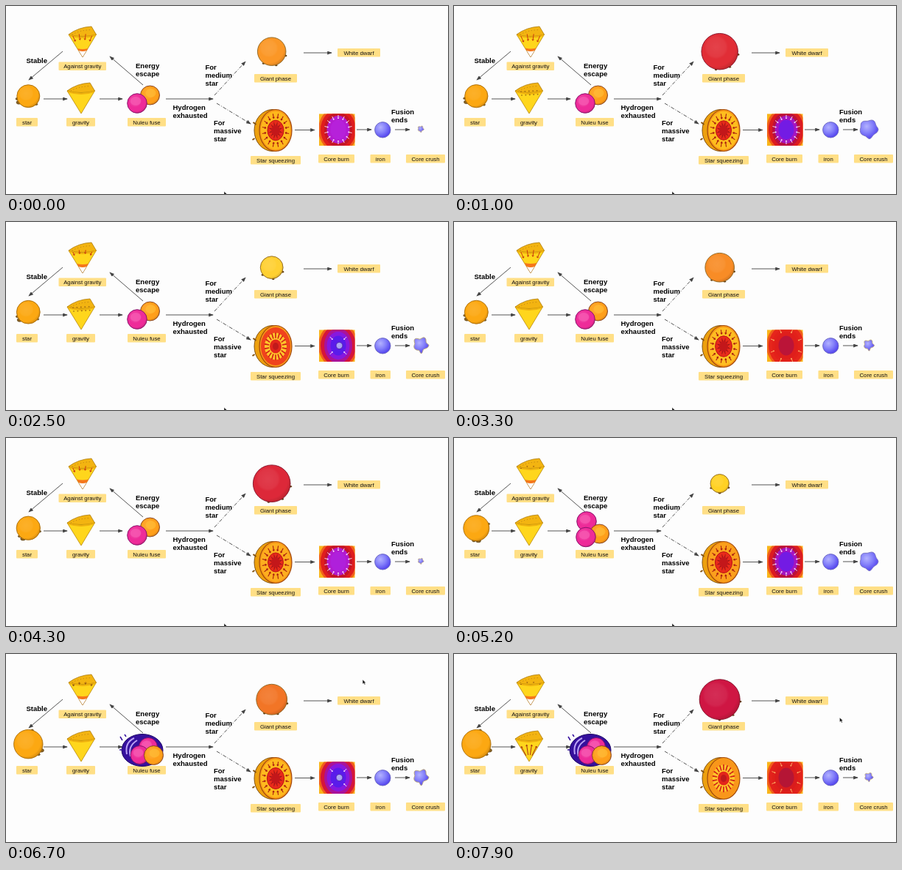
Write an HTML page that moves like this. It is 600x257 px and loops after 8 s.

```html
<!DOCTYPE html>
<html lang="en">
<head>
<meta charset="utf-8">
<title>Life of a star</title>
<style>
html, body { margin: 0; width: 100%; height: 100%; overflow: hidden; background: #fdfdfd; }
svg { display: block; width: 100vw; height: 100vh; font-family: "Liberation Sans", Arial, sans-serif; }
.label { font-size: 7.8px; fill: #111; text-anchor: middle; }
.note { font-size: 9.5px; font-weight: bold; fill: #000; }
</style>
</head>
<body>
<svg viewBox="0 0 600 257">
  <defs>
    <marker id="tip" viewBox="0 0 8 6" refX="7" refY="3" markerWidth="7" markerHeight="5" markerUnits="userSpaceOnUse" orient="auto">
      <path d="M0 0L8 3L0 6Z" fill="#444"/>
    </marker>
    <radialGradient id="lit" cx=".4" cy=".38" r=".66">
      <stop offset="0" stop-color="#fff" stop-opacity=".1"/>
      <stop offset=".4" stop-color="#fff" stop-opacity=".06"/>
      <stop offset=".5" stop-color="#fff" stop-opacity="0"/>
      <stop offset=".8" stop-color="#301000" stop-opacity="0"/>
      <stop offset="1" stop-color="#301000" stop-opacity=".2"/>
    </radialGradient>
    <radialGradient id="blue" cx=".36" cy=".34" r=".7">
      <stop offset="0" stop-color="#b3b2ff"/>
      <stop offset=".5" stop-color="#8480fa"/>
      <stop offset="1" stop-color="#5040ee"/>
    </radialGradient>
    <clipPath id="coreBox"><rect x="425" y="147.500" width="48.500" height="43.500"/></clipPath>
  </defs>
  <g id="chart"></g>
  <g id="scene"></g>
</svg>
<script>
const LOOP = 8000;
const chart = document.getElementById("chart");
const scene = document.getElementById("scene");

const phase = (t, start, period) => (((t - start) % period + period) % period) / 1000;
const lerp = (a, b, k) => Array.isArray(a) ? a.map((v, i) => lerp(v, b[i], k)) : a + (b - a) * k;
const hex = c => [1, 3, 5].map(i => parseInt(c.slice(i, i + 2), 16));

// Linear interpolation over alternating time, value arguments
function at(t, ...keys) {
  if (t <= keys[0]) return keys[1];
  for (let i = 2; i < keys.length; i += 2) {
    if (t <= keys[i]) return lerp(keys[i - 1], keys[i + 1], (t - keys[i - 2]) / (keys[i] - keys[i - 2]));
  }
  return keys[keys.length - 1];
}
const tint = (t, ...keys) =>
  `rgb(${at(t, ...keys.map(k => typeof k === "string" ? hex(k) : k)).map(Math.round)})`;

const ellipse = (x, y, rx, ry, fill, extra = "") =>
  `<ellipse cx="${x}" cy="${y}" rx="${rx}" ry="${ry}" fill="${fill}" ${extra}/>`;
const path = (d, fill, extra = "") => `<path d="${d}" fill="${fill}" ${extra}/>`;
const ball = (x, y, r, fill, edge = "#7a5418") =>
  ellipse(x, y, r, r, fill) + ellipse(x, y, r, r, "url(#lit)", `stroke="${edge}" stroke-width=".9"`);
const polar = (x, y, rx, ry, a) => [x + rx * Math.cos(a), y + ry * Math.sin(a)];

function dart([x1, y1], [x2, y2], color, width = 1, head = 2) {
  const a = Math.atan2(y2 - y1, x2 - x1);
  const [lx, ly] = polar(x2, y2, head, head, a + 2.5);
  const [rx, ry] = polar(x2, y2, head, head, a - 2.5);
  return path(`M${x1} ${y1}L${x2} ${y2}M${lx} ${ly}L${x2} ${y2}L${rx} ${ry}`, "none",
    `stroke="${color}" stroke-width="${width}"`);
}

function drawChart() {
  const label = (x, y, w, text) =>
    `<rect x="${x}" y="${y}" width="${w}" height="11.500" rx="1" fill="#ffdf86"/>
     <text class="label" x="${x + w / 2}" y="${y + 8.6}">${text}</text>`;
  const note = (x, y, ...lines) => lines.map((line, i) =>
    `<text class="note" x="${x}" y="${y + i * 11.2}">${line}</text>`).join("");
  const arrow = (d, dash = "") =>
    path(d, "none", `stroke="#555" stroke-width="1" stroke-dasharray="${dash}" marker-end="url(#tip)"`);

  chart.innerHTML = [
    label(71.500, 76.500, 64.500, "Against gravity"), label(14, 153, 29, "star"),
    label(82, 153, 39, "gravity"), label(165, 153, 52, "Nuleu fuse"),
    label(337, 93, 58, "Giant phase"), label(450, 58, 58, "White dwarf"),
    label(332, 205, 68, "Star squeezing"), label(424, 203, 49, "Core burn"),
    label(494.500, 203, 27.500, "iron"), label(543, 203, 53, "Core crush"),
    note(27.500, 78, "Stable"), note(176, 85, "Energy", "escape"),
    note(226.500, 142, "Hydrogen", "exhausted"), note(270.500, 86.500, "For", "medium", "star"),
    note(282, 163, "For", "massive", "star"), note(523, 148, "Fusion", "ends"),
    ...["M51 127H83", "M127 127H158", "M217 127H281", "M186 108L141 69", "M77 62L31 101",
      "M404 64H442", "M392 169.500H419", "M476 169H496", "M528 169H548"].map(d => arrow(d)),
    arrow("M283 122L325 76", "5 2 1 2"), arrow("M286 133L332 161", "5 2 1 2")
  ].join("");
}

function star(t) {
  const x = 30.3, y = 123.200;
  const r = at(t, 0, 15.5, 4500, 16.200, 5200, 17.5, 6500, 19.700);
  const turn = at(t, 0, 2.55, 1000, 2.6, 2500, 2.4, 3300, 2.5, 4800, 1.8, 6200, .45);
  const flares = [[0, 3.4], [.35, 2.2], [-1.75, 1.8]].map(([a, size]) => {
    const [fx, fy] = polar(x, y, r, r, turn + a);
    return ellipse(fx, fy, size, size * .7, "#8a6220", 'stroke="#54401c" stroke-width=".6"');
  }).join("");
  return flares + ball(x, y, r, "#fca812", "#a66a08");
}

// Slice with its point at (x, y): a speckled crust above a tapering face
function wedge(x, y) {
  return `<g transform="translate(${x} ${y})">` +
    path("M-19 -31Q-6 -41 12 -42L18.500 -31Q2 -24 -19 -31Z", "#f3b411", 'stroke="#ad7c10" stroke-width=".8"') +
    path("M-19 -31Q0 -26 18.500 -31L0 0Z", "#ffd61c", 'stroke="#b8860c" stroke-width=".8"') +
    path("M-14 -31Q-4 -37 12 -37.500", "none", 'stroke="#b47812" stroke-width="1" stroke-dasharray="1 3"') +
    path("M-18 -30Q0 -24 17.500 -30", "none", 'stroke="#efb10e" stroke-width="2"');
}

function gravity(t) {
  let out = wedge(102, 147);
  if (t > 600 && t < 2800) {
    for (let row = 0; row < 2; row++) for (let i = 0; i < 5; i++) {
      out += ellipse(-11 + i * 5.4 + row, -30 - i * .3 + row * 5, 1, .8, "#9b6512");
    }
  }
  if (t > 7200) {
    const reach = at(t, 7200, 8, 7900, 23);
    for (const a of [-2.05, -1.72, -1.42, -1.12]) {
      out += dart(polar(0, 0, 9, 9, a), polar(0, 0, reach, reach, a), "#a62c12");
    }
  }
  return out + "</g>";
}

function againstGravity(t) {
  const length = at(t, 0, 8, 1000, 9, 1700, 2, 2500, 5, 3300, 9, 4300, 6, 5200, 1, 6700, 3, 7900, 1);
  const band = at(t, 0, 12, 2500, 13, 3300, 14, 5200, 13);
  const start = 32;
  const slice = (d, fill) => path(`M${-d * .6} ${-d}Q0 ${-d + 2} ${d * .6} ${-d}L0 0Z`, fill);
  let out = wedge(104, 70) + slice(band, "#f5761b") + slice(9, "#fff") +
    path("M-5.400 -9L0 0L5.400 -9", "none", 'stroke="#b79468" stroke-width=".6"');
  for (const a of [-2, -1.72, -1.44, -1.16]) {
    out += dart(polar(0, 0, start, start, a), polar(0, 0, start - length, start - length, a),
      length < 4 ? "#96580f" : "#c93a0d", 1, Math.min(2.2, length));
  }
  return out + "</g>";
}

function fusion(t) {
  const pink = (x, y, r = 13.3) => ball(x, y, r, "#ee2b99", "#7d1168") +
    ellipse(x - 2, y - 3, r * .55, r * .45, "#f962b8", 'opacity=".6"');
  const gold = (x, y) => ball(x, y, 13, "#ff9f1a", "#7d3b23") +
    ellipse(x + 1, y - 3, 7, 6, "#ffbc34", 'opacity=".7"');
  if (t < 4600) return gold(195.500, 122) + pink(178, 133);
  if (t < 6000) return pink(180, at(t, 4600, 92, 5000, 114)) + gold(197.500, 131) + pink(179, 135.500);
  return ellipse(185, 131.500, 28, 22, "#35109d", 'stroke="#1d0766"') +
    path("M164 137Q161 121 174 115M169 140Q165 126 178 118", "none", 'stroke="#bba2f5" stroke-width="2"') +
    path("M158 118l-3 -5M154 131h4M163 113l-2 -3", "none", 'stroke="#35109d" stroke-width="1.500"') +
    pink(193, 127, 12.500) + pink(181.500, 138, 12.5) + gold(200.500, 138.500);
}

function giant(t) {
  const s = phase(t, 1700, 3200);
  const r = 11 + 5.5 * s;
  const color = tint(s, 0, "#ffd21c", .8, "#ffd032", 1.5, "#fb9726", 1.8, "#f27526", 2.5, "#e12d36", 3.1, "#cc1245");
  const flares = [.5, 1.65, 2.75].map((a, i) => {
    const [x, y] = polar(360.700, 62, r + .6, r + .6, a - s * (i + 1) * .13);
    return ellipse(x, y, 1.8, 1.3, "#624018");
  }).join("");
  return flares + ball(360.700, 62.200, r, color, s > 2.2 ? "#82122a" : "#8b6420");
}

function squeezing(t) {
  const s = t / 1000;
  const x = 366, y = 170;
  const hot = (s > 1.9 && s < 2.9) || s > 7.3;
  const face = tint(s, 0, "#ffb81c", 1.3, "#ffc01e", 2.3, "#f0431d", 2.7, "#f0431d",
    3.2, "#ffc022", 5.2, "#fba01d", 6.7, "#ffba1e", 7.9, "#f9961b");
  const spokes = (count, from, to, color, width, head) => Array.from({ length: count }, (_, i) => {
    const a = (i + .5) * 2 * Math.PI / count;
    return dart(polar(x, y, from, from * 1.25, a), polar(x, y, to, to * 1.25, a), color, width, head);
  }).join("");
  const body = ellipse(362, y, 25, 28.500, "#eda00e", 'stroke="#805113"') +
    path("M339.500 162l-4 -3M337.500 181l-3 2", "none", 'stroke="#805113" stroke-width="2"') +
    ellipse(x, y, 22, 28.500, "#f79a17", 'stroke="#a2480f" stroke-width="1.200"') +
    ellipse(x, y, 20, 26, face);
  if (hot) {
    return body + ellipse(x, y, 15, 18.500, "#ffc52b") + spokes(18, 9, 14.500, "#d01f16", 1.6, 1) +
      ellipse(x, y, 8, 9.500, "#e3261b") + ellipse(x, y, 4, 5, "#c01a1b");
  }
  const inner = 11 + Math.sin(s * 4) * .6;
  return body + spokes(16, 18.500, inner + 2.500, "#a91c10", 1.1, 2) +
    ellipse(x, y, inner, inner * 1.25, "#e92a1b", 'stroke="#b91315"') +
    spokes(12, 9, 6, "#791018", .7, 1) + ellipse(x, y, 6, 7.5, "#c3171a");
}

function coreBurn(t) {
  const s = phase(t, 3000, 4200);
  const x = 451, y = 169;
  const outer = tint(s, 0, "#e8281b", 1.2, "#df1d1d", 2.2, "#dc1b20", 3.7, "#d5153a");
  const middle = tint(s, 0, "#e5221a", .7, "#df201a", 1.2, "#c51527", 2.2, "#ba103d", 3.7, "#a9139a");
  const inner = tint(s, 0, "#e2201c", .7, "#da1c1d", 1.2, "#b41bd0", 2.2, "#a515c0", 3.7, "#8718df");
  const core = tint(s, 0, "#c0143a", .7, "#b51535", 1.2, "#b621da", 2.2, "#731be4", 3.7, "#5a1bea");
  let out = '<g clip-path="url(#coreBox)"><rect x="425" y="147" width="49" height="45" fill="#f9b51b"/>' +
    ellipse(x, y, 27, 31, "#f0601a") + ellipse(x, y, 24, 28, outer) +
    ellipse(x, y, 19, 24, middle) + ellipse(x, y, 15.500, 19, inner) + ellipse(x, y, 10.500, 13.500, core);
  const reach = at(s, 0, 19, 1.2, 14, 2.2, 14, 4.2, 10);
  const count = s < 1 ? 8 : s < 3 ? 14 : 4;
  for (let i = 0; i < count; i++) {
    const a = (i + .5) * 2 * Math.PI / count;
    out += dart(polar(x, y, reach + 5, reach + 6, a), polar(x, y, reach, reach + 1, a),
      s < 1 ? "#ffb76a" : "#fff0ff", .9, 1.4);
  }
  if (s > 3.2) out += ball(452.500, y, 4.5, "#a99df4", "#4b21a5");
  return out + "</g>";
}

// A lumpy ball that shrinks and narrows towards its foot
function crush(t) {
  const s = phase(t, 500, 4200);
  const size = at(s, .5, 13, 2, 10.500, 2.8, 7.2, 3.7, 4.2, 4.2, 2.5);
  const rough = at(s, 0, .06, 2, .16);
  const points = Array.from({ length: 36 }, (_, i) => {
    const a = i * Math.PI / 18;
    const r = size * (.94 + rough * Math.sin(5 * a + .7));
    const px = 563 + r * Math.cos(a) * (1 - rough * 3 * Math.max(0, Math.sin(a)));
    return `${px.toFixed(2)} ${(168.300 + r * Math.sin(a)).toFixed(2)}`;
  });
  return path(`M${points.join("L")}Z`, "url(#blue)",
    `stroke="${tint(s, 0, "#6661c6", 1, "#8b86c4", 2, "#b9a77c", 3.7, "#c7b48e")}" stroke-width="1"`);
}

function cursor(t) {
  const [x, y] = at(t, 6400, [296, 253.500], 6600, [483, 18], 6700, [484, 35], 7200, [523.500, 87]);
  return `<g transform="translate(${x} ${y})">` +
    path("M0 0V6L1.500 4.700L2.700 7L3.800 6.500L2.600 4.300H4.500Z", "#111", 'stroke="#fff" stroke-width=".4"') + "</g>";
}

const iron = () => ellipse(511.300, 169.300, 10.700, 10.700, "url(#blue)", 'stroke="#6865bd" stroke-width=".9"');

function render(t) {
  scene.innerHTML = [star, gravity, againstGravity, fusion, giant, squeezing, coreBurn, iron, crush, cursor]
    .map(draw => draw(t)).join("");
}

drawChart();
render(0);
const began = performance.now();
function tick() {
  render((performance.now() - began) % LOOP);
  requestAnimationFrame(tick);
}
requestAnimationFrame(tick);
</script>
</body>
</html>
```
